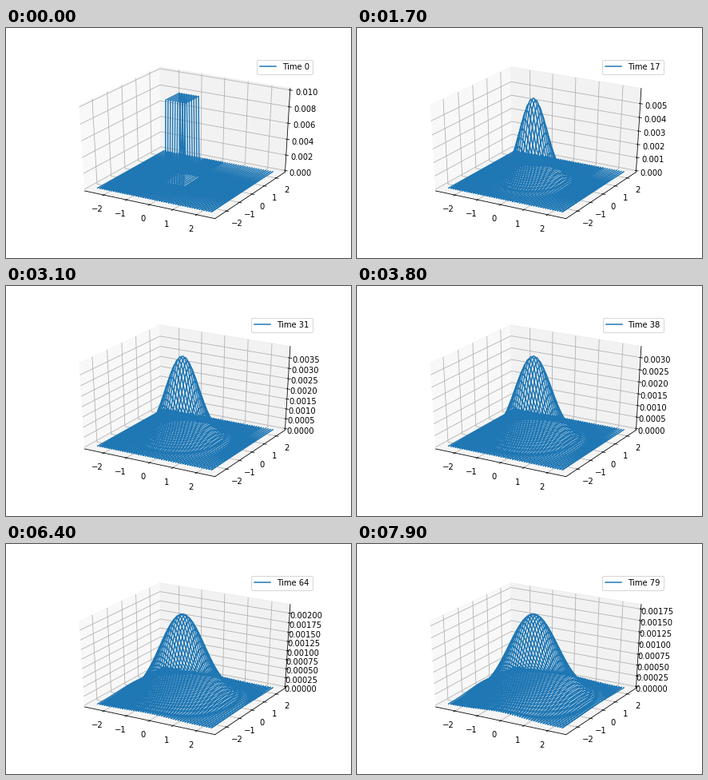
Write a matplotlib script that moves like this. It is 432 px wide and 288 px high and loops after 8000 ms.

```python
import math

import matplotlib.pyplot as plt
import numpy as np
from matplotlib.animation import FuncAnimation
from matplotlib.ticker import MaxNLocator

FRAMES, INTERVAL = 80, 100
STEP, COUNT = 0.1, 50
HEIGHT = 0.01
SPREAD = 0.99           # variance gained per step, in cells squared
BOX_X, BOX_Y = (19, 28), (19, 30)
MARGIN = 1 / 48

erf = np.vectorize(math.erf)
cells = np.arange(COUNT)
axis = -2.5 + STEP * cells
X, Y = (g.ravel() for g in np.meshgrid(axis, axis, indexing="ij"))


def profile(start, stop, t):
    """Box of ones from start to stop, diffused for t steps."""
    if t == 0:
        return ((cells >= start) & (cells < stop)).astype(float)
    s = math.sqrt(2 * SPREAD * t)
    return (erf((stop - 0.5 - cells) / s) - erf((start - 0.5 - cells) / s)) / 2


def density(t):
    return HEIGHT * np.outer(profile(*BOX_X, t), profile(*BOX_Y, t)).ravel()


def padded(lo, hi, pad):
    return lo - (hi - lo) * pad, hi + (hi - lo) * pad


plt.rcParams.update({"font.family": "DejaVu Sans", "font.size": 10, "text.kerning_factor": 6})
fig = plt.figure(figsize=(6, 4), dpi=72)
fig.subplots_adjust(left=0.125, right=0.9, bottom=0.125, top=0.88)
ax = fig.add_subplot(projection="3d")
ax.view_init(30, -60)
ax.set_box_aspect((1, 1, 1), zoom=math.sqrt(3) / 1.8294640721620434)
ax.apply_aspect = lambda position=None: None  # fill the whole subplot

# One unbroken line sweeps the grid column by column.
line, = ax.plot(X, Y, density(0), label="Time 0")
legend = ax.legend(loc="upper right")
limits = padded(*padded(axis[0], axis[-1], 0.05), MARGIN)
ax.set_xlim(*limits, view_margin=0)
ax.set_ylim(*limits, view_margin=0)
ax.set_xticks(range(-2, 3))
ax.set_yticks(range(-2, 3))
locator = MaxNLocator(9, steps=[1, 2, 2.5, 5, 10])


def draw(t):
    z = density(t)
    top = z.max()
    line.set_data_3d(X, Y, z)
    ax.set_zticks([v for v in locator.tick_values(0, top) if -1e-9 <= v <= top * 1.0001])
    ax.set_zlim(*padded(0, top, MARGIN), view_margin=0)
    legend.get_texts()[0].set_text(f"Time {t}")
    return []


anim = FuncAnimation(fig, draw, frames=FRAMES, interval=INTERVAL, repeat=True, repeat_delay=0)
plt.show()
```
